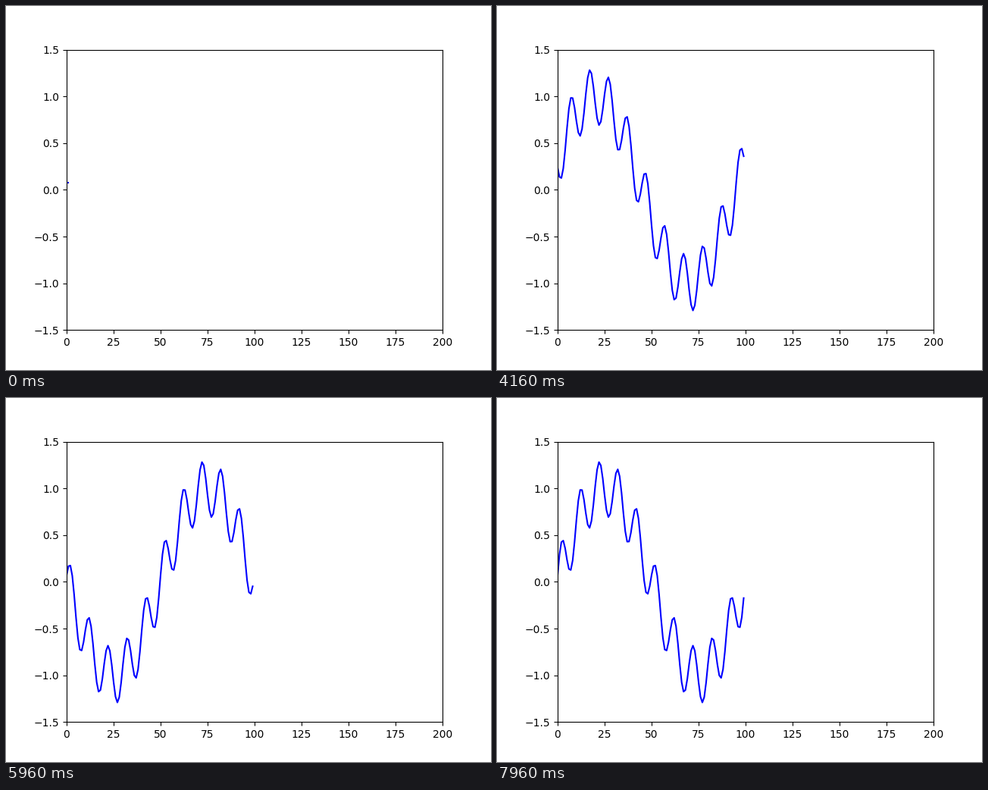
Recreate the animation shown at these times as a matplotlib script. Size 640 px wide and 480 px high, loop 8 s.

```python
import numpy as np
import matplotlib.pyplot as plt
from matplotlib.animation import FuncAnimation

FRAMES = 200
INTERVAL = 40   # ms
WINDOW = 100    # samples kept on screen


def signal(i):
    """Slow wave with a ripple ten times as fast."""
    t = 2 * np.pi * i / 100
    return np.sin(t) + 0.3 * np.sin(10 * t + 0.25)


# The first sample is doubled so that the trace starts as a short line.
steps = np.arange(-1, FRAMES).clip(min=0)
samples = signal(steps)

fig, ax = plt.subplots(figsize=(6.4, 4.8), dpi=100)
ax.set_xlim(0, 200)
ax.set_ylim(-1.5, 1.5)
line, = ax.plot([], [], color="blue", lw=1.5)


def init():
    line.set_data([], [])
    return line,


def update(n):
    end = n + 2
    y = samples[max(0, end - WINDOW):end]
    line.set_data(np.arange(len(y)), y)
    return line,


anim = FuncAnimation(fig, update, frames=FRAMES, init_func=init,
                     interval=INTERVAL, repeat=True, repeat_delay=0,
                     blit=False)
plt.show()
```
